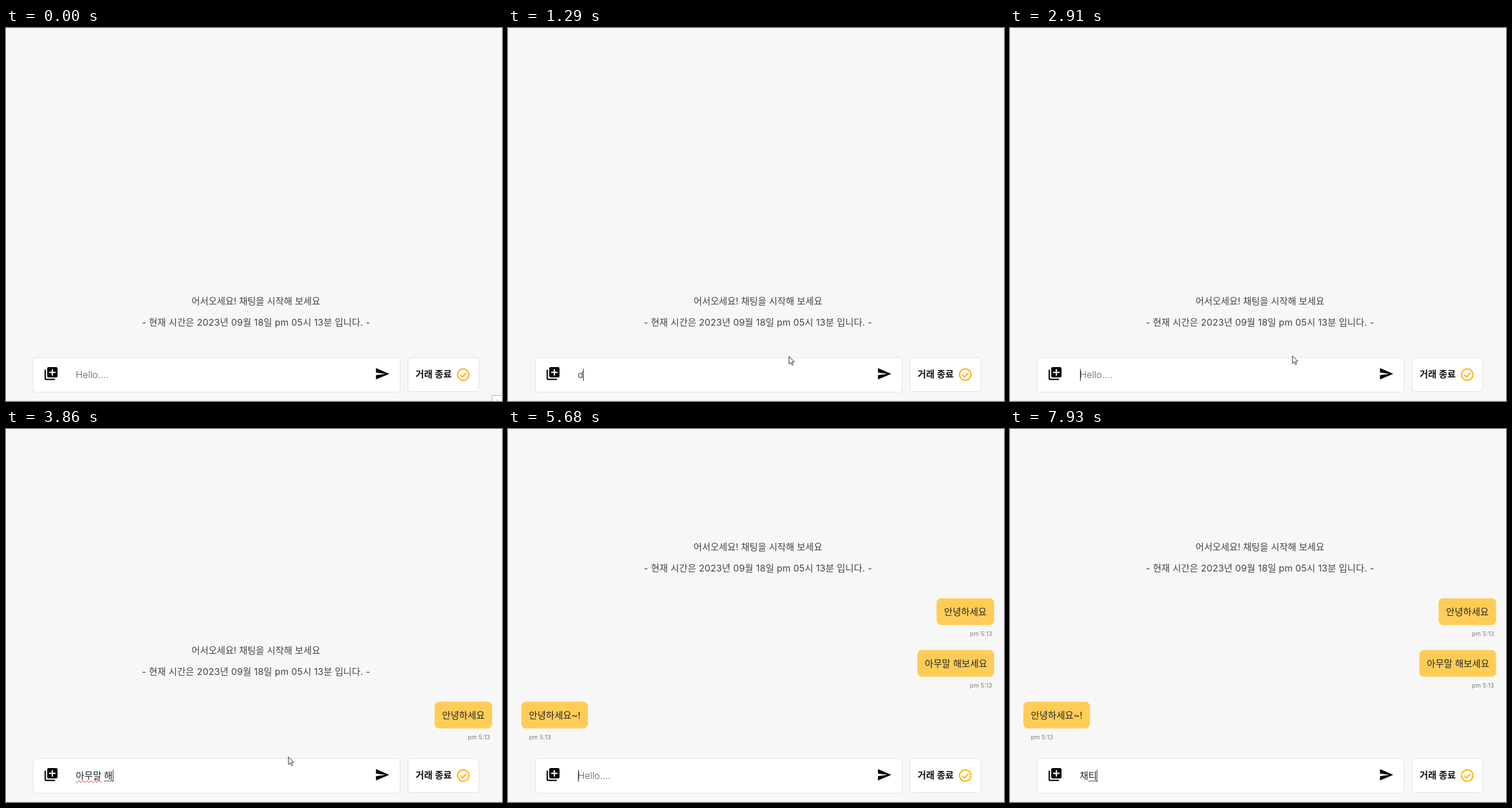
Animation, 864 px wide and 649 px high, one loop 8000 ms. Source, as an HTML page:

```html
<!DOCTYPE html>
<html lang="ko">
<head>
<meta charset="utf-8">
<title>Chat</title>
<style>
  html, body { margin: 0; width: 100%; height: 100%; overflow: hidden; background: #f7f7f7; }
  body, svg text { font-family: Inter, "Noto Sans CJK KR", "Noto Sans CJK", sans-serif; }
  svg { position: absolute; left: 0; top: 0; display: block; }
  .intro { font-size: 16px; fill: #444; text-anchor: middle; }
  .date { letter-spacing: .15px; }
  .bubble { fill: #ffcd57; }
  .msg { font-size: 16.2px; fill: #262626; }
  .time { font-size: 10.5px; fill: #7c7f83; }
  .card { fill: #fff; stroke: #e1e1e1; }
  .done { font-size: 16px; font-weight: 600; fill: #111; }
  #field {
    position: absolute; left: 121.6px; top: 593px; height: 21px;
    font-size: 16.2px; font-weight: 300; line-height: 21px; white-space: pre; color: #222;
  }
  #caret {
    display: inline-block; width: 1px; height: 21px; margin-right: -1px;
    vertical-align: top; background: #222;
  }
  #hint { color: #5c5c5c; }
  #typo { text-decoration: underline wavy #e02020 1px; text-underline-offset: 2px; text-decoration-skip-ink: none; }
  #compose { text-decoration: underline #444 1px; text-underline-offset: 3px; text-decoration-skip-ink: none; }
</style>
</head>
<body>
<svg width="864" height="649" viewBox="0 0 864 649">
  <g id="feed">
    <text class="intro" x="435.3" y="481">어서오세요! 채팅을 시작해 보세요</text>
    <text class="intro date" x="435.5" y="518">- 현재 시간은 2023년 09월 18일 pm 05시 13분 입니다. -</text>
  </g>
  <rect class="card" x="47.5" y="573.5" width="639" height="60" rx="5"/>
  <rect class="card" x="700.5" y="573.5" width="123" height="59" rx="5"/>
  <path d="M0 648.5H864" stroke="#e6e6e6"/>
  <path transform="translate(65 587.8) scale(1.125)" d="M4 6H2v14c0 1.1.9 2 2 2h14v-2H4V6zm16-4H8c-1.1 0-2 .9-2 2v12c0 1.1.9 2 2 2h12c1.1 0 2-.9 2-2V4c0-1.1-.9-2-2-2zm-1 9h-4v4h-2v-4H9V9h4V5h2v4h4v2z"/>
  <path transform="translate(642.3 588.5) scale(1.1)" d="M2 21L23 12 2 3v7l15 2-15 2z"/>
  <text class="done" x="713.5" y="608">거래 종료</text>
  <g fill="none" stroke="#ffb21a" stroke-width="2.2">
    <circle cx="796.5" cy="603" r="9.9"/>
    <path d="M791 603.2l4 4 7.2-7.4"/>
  </g>
  <g id="corner">
    <rect x="846.5" y="639.5" width="30" height="20" fill="#fff" stroke="#b0b0b0"/>
    <path d="M855 648.5h2" stroke="#999"/>
  </g>
</svg>
<div id="field"><span id="typo"></span><span id="text"></span><span id="compose"></span><span id="caret"></span><span id="hint">Hello....</span></div>
<svg width="864" height="649" viewBox="0 0 864 649">
  <path id="mouse" d="M.5 .5v13.2l3-2.9 2.1 4.9 2.2-1-2.1-4.7h4.2z" fill="#fff" stroke="#222"/>
</svg>
<script>
const LOOP = 8000, STEP = 70, ROW = 90;
const $ = id => document.getElementById(id);

// [text, bubble x, bubble width, time x, time anchor, shown at]
const messages = [
  ['안녕하세요', 746.5, 100.3, 843.2, 'end', 2980],
  ['아무말 해보세요', 713, 133.8, 843.2, 'end', 4540],
  ['안녕하세요~!', 23.3, 115.8, 36.4, 'start', 5680],
];

// [time, settled text, syllable being composed]
const typing = [
  [0, '', ''],
  [1290, 'd', ''], [1360, 'dk', ''], [1510, 'd', ''], [1590, '', ''],
  [1670, '', 'ㅇ'], [1750, '', '아'], [1830, '', '안'], [1910, '안', 'ㄴ'],
  [1990, '안', '녀'], [2070, '안', '녕'], [2160, '안녕', 'ㅎ'], [2250, '안녕', '하'],
  [2380, '안녕', '핫'], [2450, '안녕하', '세'], [2520, '안녕하', '셍'],
  [2600, '안녕하세', '요'], [2770, '안녕하세요', ''], [2910, '', ''],
  [3180, '', 'ㅇ'], [3250, '', '아'], [3320, '', '암'], [3390, '아', '무'],
  [3460, '아', '뭄'], [3530, '아무', '마'], [3600, '아무', '말'], [3720, '아무말 ', ''],
  [3790, '아무말 ', 'ㅎ'], [3860, '아무말 ', '해'], [3930, '아무말 ', '햅'],
  [4000, '아무말 해', '보'], [4080, '아무말 해보', '세'], [4180, '아무말 해보', '셍'],
  [4290, '아무말 해보세', '요'], [4470, '', ''],
  [7650, '', 'ㅊ'], [7750, '', '채'], [7840, '', '챝'], [7930, '채', '티'],
];

const blink = [[0, 0], [890, 1], [5010, 0], [5540, 1], [6080, 0], [6540, 1], [7070, 0], [7530, 1]];

// [time, x, y]
const path = [
  [70, 844, 632], [450, 640, 606], [830, 505, 592], [1220, 489, 571],
  [1510, 489, 571], [1750, 491.5, 570], [4870, 491.5, 570], [5080, 623, 497], [5210, 623, 497],
];

const at = (table, t) => table.findLast(row => row[0] <= t);

function place(t) {
  const q = Math.floor(t / STEP) * STEP;
  const i = path.findIndex(p => p[0] > q);
  if (i < 1) return null;
  const [t0, x0, y0] = path[i - 1], [t1, x1, y1] = path[i];
  const k = (q - t0) / (t1 - t0);
  return [x0 + (x1 - x0) * k, y0 + (y1 - y0) * k];
}

function add(parent, tag, attrs, text = '') {
  const el = document.createElementNS('http://www.w3.org/2000/svg', tag);
  for (const name in attrs) el.setAttribute(name, attrs[name]);
  el.textContent = text;
  return parent.appendChild(el);
}

const rows = messages.map(([text, x, width, timeX, anchor], i) => {
  const g = add($('feed'), 'g', { transform: `translate(0 ${ROW * (i + 1)})` });
  add(g, 'rect', { class: 'bubble', x, y: 474.5, width, height: 46.5, rx: 8 });
  add(g, 'text', { class: 'msg', x: x + 13, y: 503.5 }, text);
  add(g, 'text', { class: 'time', x: timeX, y: 540, 'text-anchor': anchor }, 'pm 5:13');
  return g;
});

const show = (el, on) => { el.style.display = on ? '' : 'none'; };

function draw(t) {
  const shown = messages.filter(m => m[5] <= t).length;
  $('feed').setAttribute('transform', `translate(0 ${-ROW * shown})`);
  rows.forEach((row, i) => show(row, i < shown));

  const [, settled, composing] = at(typing, t);
  const typo = settled.startsWith('아무말 ') ? '아무말' : '';
  $('typo').textContent = typo;
  $('text').textContent = settled.slice(typo.length);
  $('compose').textContent = composing;
  show($('hint'), !settled && !composing);
  $('caret').style.opacity = at(blink, t)[1];

  show($('corner'), t < STEP);
  const pos = place(t);
  show($('mouse'), pos);
  if (pos) $('mouse').setAttribute('transform', `translate(${pos})`);
}

const start = performance.now();
function tick() {
  draw((performance.now() - start) % LOOP);
  requestAnimationFrame(tick);
}
tick();
</script>
</body>
</html>
```
